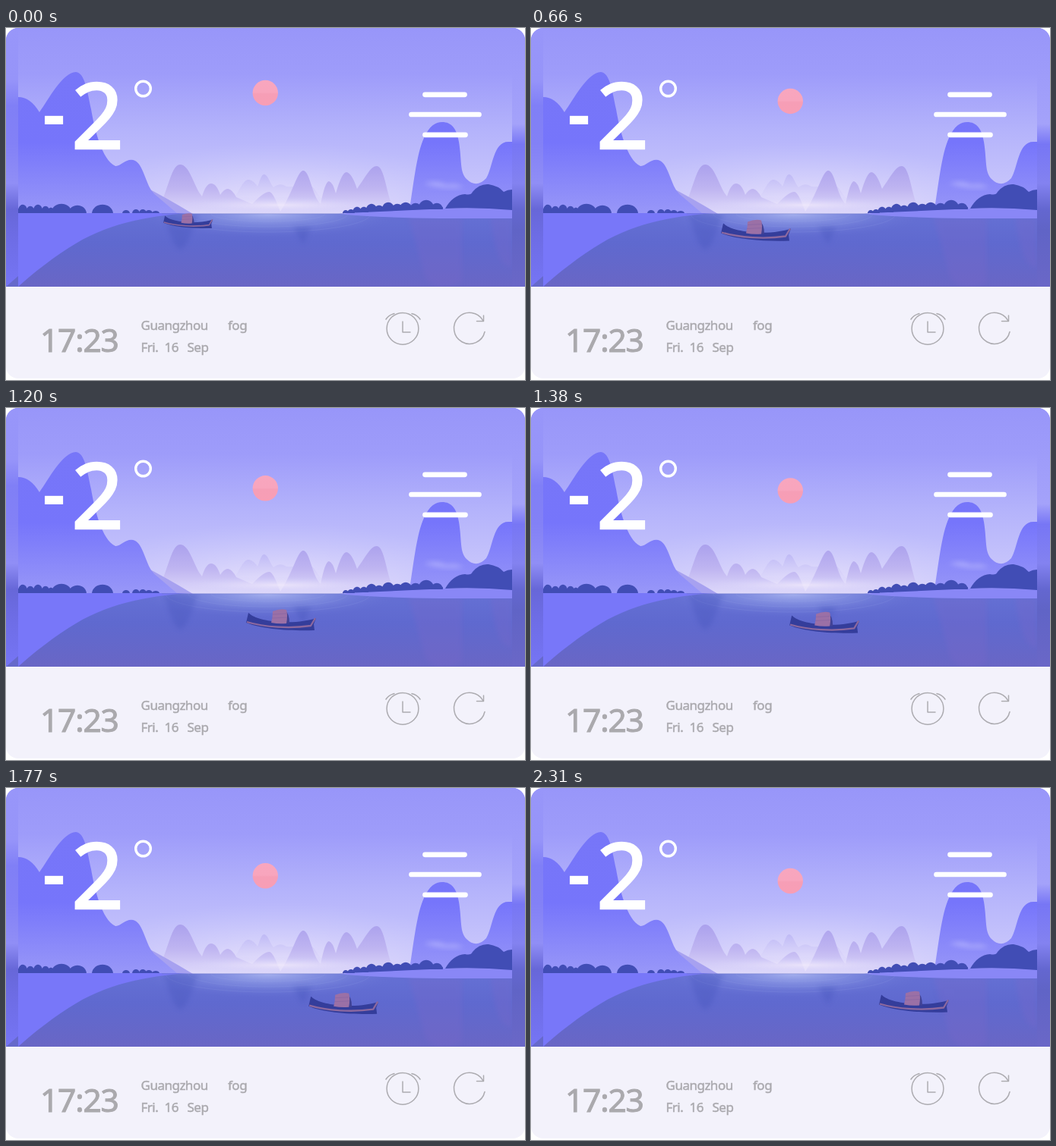
These frames come from a looping animation (683x464 px, 2340 ms). An HTML page:

```html
<!DOCTYPE html>
<html lang="en">
<head>
<meta charset="utf-8">
<title>Weather card</title>
<style>
  html, body { margin: 0; width: 100%; height: 100%; overflow: hidden; background: #fff; }
  svg { display: block; width: 683px; height: 464px; }
  text { font-family: "Noto Sans", "Open Sans", sans-serif; }
  .info { font-size: 17px; letter-spacing: -.5px; fill: #aaa9ae; stroke: #aaa9ae; stroke-width: .45; }
  .icon { fill: none; stroke: #adacb1; stroke-width: 1.5; stroke-linecap: round; stroke-linejoin: round; }
</style>
</head>
<body>
<svg viewBox="0 0 683 464">
  <defs>
    <clipPath id="card"><rect width="683" height="462" rx="16"/></clipPath>
    <clipPath id="view"><rect x="16" width="650" height="341"/></clipPath>
    <clipPath id="lake"><rect x="16" y="245" width="650" height="96"/></clipPath>
    <linearGradient id="sky" x2="0" y2="1">
      <stop stop-color="#9896f9"/><stop offset=".25" stop-color="#9e9cfa"/>
      <stop offset=".55" stop-color="#b4b3fb"/><stop offset="1" stop-color="#d0cdfb"/>
    </linearGradient>
    <radialGradient id="haze">
      <stop stop-color="#efe8fb"/><stop offset=".4" stop-color="#e2ddfb" stop-opacity=".65"/>
      <stop offset="1" stop-color="#cccafb" stop-opacity="0"/>
    </radialGradient>
    <linearGradient id="faint" gradientUnits="userSpaceOnUse" x1="0" x2="0" y1="192" y2="232">
      <stop stop-color="#b5aef2" stop-opacity=".65"/><stop offset="1" stop-color="#d5cff8" stop-opacity="0"/>
    </linearGradient>
    <linearGradient id="far" gradientUnits="userSpaceOnUse" x1="0" x2="0" y1="180" y2="244">
      <stop stop-color="#aba1ed"/><stop offset=".5" stop-color="#bfb5f1"/><stop offset="1" stop-color="#dfd9fa"/>
    </linearGradient>
    <linearGradient id="near" gradientUnits="userSpaceOnUse" x1="0" x2="0" y1="58" y2="244">
      <stop stop-color="#7776f8"/><stop offset=".5" stop-color="#7675fb"/><stop offset="1" stop-color="#9897f8"/>
    </linearGradient>
    <linearGradient id="water" x2="0" y2="1">
      <stop stop-color="#6570d4"/><stop offset=".4" stop-color="#5f69cf"/><stop offset="1" stop-color="#6966c5"/>
    </linearGradient>
    <radialGradient id="glow">
      <stop stop-color="#a5b0ee"/><stop offset=".5" stop-color="#8390e1" stop-opacity=".65"/>
      <stop offset="1" stop-color="#6570d4" stop-opacity="0"/>
    </radialGradient>
    <linearGradient id="sunFill" x2="0" y2="1">
      <stop stop-color="#f8a6be"/><stop offset=".48" stop-color="#f8a5bd"/>
      <stop offset=".54" stop-color="#f69eb6"/><stop offset="1" stop-color="#f89eb5"/>
    </linearGradient>
    <linearGradient id="leftEdge" x2="0" y2="1">
      <stop stop-color="#9896f9"/><stop offset=".2" stop-color="#9694f9"/><stop offset=".3" stop-color="#807ff6"/>
      <stop offset=".45" stop-color="#8381f6"/><stop offset=".6" stop-color="#908ef6"/>
      <stop offset=".7" stop-color="#6767d8"/><stop offset=".8" stop-color="#6d6ce4"/><stop offset="1" stop-color="#7675f5"/>
    </linearGradient>
    <linearGradient id="rightEdge" x2="0" y2="1">
      <stop stop-color="#9896f9"/><stop offset=".37" stop-color="#a4a2fa"/><stop offset=".45" stop-color="#7776f5"/>
      <stop offset=".6" stop-color="#8382f0"/><stop offset=".7" stop-color="#6467d0"/>
      <stop offset=".78" stop-color="#6064c6"/><stop offset="1" stop-color="#6a67c7"/>
    </linearGradient>
    <filter id="soft" x="-50%" y="-50%" width="200%" height="200%"><feGaussianBlur stdDeviation="3"/></filter>
    <filter id="hint"><feGaussianBlur stdDeviation=".5"/></filter>
  </defs>

  <g clip-path="url(#card)">
    <rect width="683" height="341" fill="url(#sky)"/>
    <rect width="16" height="341" fill="url(#leftEdge)"/>
    <path d="M0 341L16 327V341Z" fill="#6669cb"/>
    <rect x="666" width="17" height="341" fill="url(#rightEdge)"/>

    <g clip-path="url(#view)">
      <rect width="683" height="245" fill="url(#sky)"/>
      <ellipse cx="360" cy="246" rx="290" ry="95" fill="url(#haze)"/>
      <circle id="sun" cx="341.3" r="16.7" fill="url(#sunFill)"/>

      <path fill="url(#faint)" d="M300 225C309 210 313 199 320 200Q327 202 331 209C335 199 336 193 340 193C345 194 347 204 352 210Q361 203 369 209Q378 210 384 208Q395 202 405 211L420 232H300Z"/>
      <path fill="url(#far)" d="M196 244C212 225 216 180 229 180C242 180 247 209 258 222Q263 205 270 205Q277 205 282 220Q287 212 292 212Q298 213 303 223L324 232Q340 215 347 216Q352 217 361 242C376 220 384 188 391 188C400 188 402 220 414 232Q420 202 425 202Q430 203 434 218Q442 190 448 190Q455 191 462 212C474 195 480 182 488 182C498 182 501 220 508 232V244Z"/>
      <rect x="200" y="222" width="320" height="23" fill="url(#haze)" opacity=".8"/>

      <path fill="#a7a1f0" d="M180 208Q208 222 246 245H180Z"/>
      <path fill="url(#near)" d="M16 91Q32 91 44 111C56 94 74 59 92 58C104 59 107 84 112 107C116 131 126 174 144 182C151 183 159 170 170 175C180 180 184 204 192 215Q195 219 199 222L226 245H16Z"/>
      <path fill="url(#near)" d="M530 245C536 210 540 166 550 145C557 129 565 124 574 124C586 124 593 132 596 150C600 175 597 190 606 199Q619 212 632 198C641 183 641 150 661 150H666V245Z"/>
      <path fill="#c6c4ff" opacity=".55" filter="url(#soft)" d="M550 205Q568 200 580 207Q592 204 602 210Q575 213 550 205Z"/>

      <rect y="245" width="683" height="96" fill="url(#water)"/>
      <g clip-path="url(#lake)">
        <ellipse cx="345" cy="245" rx="175" ry="32" fill="url(#glow)"/>
        <g fill="none" stroke="#a4aeea" stroke-opacity=".15">
          <ellipse cx="345" cy="245" rx="75" ry="10"/><ellipse cx="345" cy="245" rx="105" ry="17"/>
          <ellipse cx="345" cy="245" rx="135" ry="24"/>
        </g>
        <g filter="url(#soft)" opacity=".28">
          <path fill="#3f50b7" d="M208 246H252Q238 292 229 292Q220 290 208 246ZM378 262H402L391 285Z"/>
          <path fill="#7d68c9" d="M530 250H600V335Q570 350 552 330ZM638 250H666V315Q645 318 638 250Z"/>
        </g>
      </g>
      <path fill="#7877f9" d="M16 244H240C185 248 135 258 92 284C65 300 37 322 16 341Z"/>
      <path fill="#8987f6" d="M438 245C500 239 580 237 666 237V251H570Q490 250 438 245Z"/>
      <path fill="none" stroke="#6d76ca" stroke-opacity=".6" d="M205 244.8H445"/>
      <g id="trees" fill="#414db5"></g>
      <path fill="#414db5" d="M443 244Q500 242 575 238V236Q500 237 443 243Z"/>
      <path fill="#414db5" d="M578 238Q588 220 604 219Q612 221 614 216Q623 205 635 206Q648 208 655 216Q660 213 666 213V240Q620 236 578 238Z"/>

      <g id="boat" filter="url(#hint)">
        <path fill="#343d9b" d="M3 5C10 11 20 15 45 17C65 18 80 16 92 12L89 20L90 28C60 29 22 27 0 18Z"/>
        <path fill="none" stroke="#8c689f" stroke-width="2.3" d="M1 17C24 24 58 26 85 22L91 12"/>
        <path fill="#414295" d="M50 1Q57 5 57 19L49 19Z"/>
        <path fill="#9b70a6" d="M35 3Q45 -1 53 1Q55 8 53 19Q43 20 33 18Q35 11 35 3Z"/>
        <path fill="none" stroke="#8060a0" stroke-width=".5" d="M35 7L53 6M34 12L54 11"/>
      </g>
    </g>

    <rect y="341" width="683" height="123" fill="#f3f2fb"/>
  </g>

  <g fill="#fff">
    <text x="48.3" y="145.5" style="font:700 92px 'Open Sans',sans-serif">-</text>
    <text x="86" y="159" font-size="121" stroke="#fff" stroke-width="2.4">2</text>
  </g>
  <g fill="none" stroke="#fff" stroke-linecap="round">
    <circle cx="180.5" cy="80" r="9.8" stroke-width="3.4"/>
    <path stroke-width="6.7" d="M551.5 87.8H603.5M533.5 114H622.5M551.5 140.8H604.5"/>
  </g>

  <text x="45" y="426.5" font-size="42.5" letter-spacing="-1.2" fill="#aaa9ad" stroke="#aaa9ad" stroke-width="1">17:23</text>
  <g class="info">
    <text x="177.5" y="398">Guangzhou</text><text x="292" y="398">fog</text>
    <text x="177.5" y="427">Fri.</text><text x="208.5" y="427">16</text><text x="238.5" y="427">Sep</text>
  </g>
  <g class="icon">
    <circle cx="522" cy="396.3" r="20.9"/>
    <path d="M522 387V401H532M500 384Q504 378 511 376.5M534 376.5Q541 378 545 384"/>
    <path d="M630 400.5A20.5 20.5 0 1 1 628 386M628.5 379V386.5H619.5"/>
  </g>
</svg>
<script>
const LOOP = 2340, STEP = 30, START = 30, END = 2160;
const sun = document.getElementById('sun');
const boat = document.getElementById('boat');

// Bushes: centre x, half width, height, base y
const bushes = [
  [22, 7, 11, 244], [32, 6, 9, 244], [42, 7, 11, 244], [52, 6, 9, 244], [59, 5, 7, 244],
  [73, 14, 12, 244], [94, 12, 10, 244], [127, 14, 11, 244],
  [158, 5, 4, 244], [171, 5, 5, 244], [180, 5, 5, 244], [188, 5, 4, 244], [197, 5, 3, 244],
  [447, 4, 4, 244], [454, 5, 5, 244], [462, 6, 7, 243], [471, 6, 7, 243], [481, 8, 10, 242],
  [491, 7, 7, 241], [503, 9, 11, 241], [515, 8, 8, 240], [526, 9, 10, 240],
  [539, 8, 8, 239], [553, 11, 12, 239], [567, 8, 8, 239]
];
document.getElementById('trees').innerHTML = bushes.map(([x, w, h, y]) =>
  `<path d="M${x - w} ${y}C${x - w * .85} ${y - h * 1.36} ${x + w * .85} ${y - h * 1.36} ${x + w} ${y}Z"/>`).join('');

// Boat course: time, left, top
const course = [
  [30, 207, 244], [300, 226, 248], [660, 250, 252.5], [1200, 316, 265],
  [1560, 366, 270.5], [1980, 431, 268], [2160, 458, 267.5]
];

function along(t, axis) {
  let i = 0;
  while (i < course.length - 2 && t > course[i + 1][0]) i++;
  const slope = k => {
    const a = course[Math.max(k - 1, 0)], b = course[Math.min(k + 1, course.length - 1)];
    return (b[axis] - a[axis]) / (b[0] - a[0]);
  };
  const a = course[i], b = course[i + 1], d = b[0] - a[0], u = (t - a[0]) / d, v = 1 - u;
  return a[axis] * v * v * (1 + 2 * u) + b[axis] * u * u * (3 - 2 * u)
    + d * u * v * (slope(i) * v - slope(i + 1) * u);
}

function draw(now) {
  const tick = Math.floor((now % LOOP) / STEP) * STEP;
  const t = Math.min(Math.max(tick, START), END);
  sun.setAttribute('cy', 85.5 + 37 * (t - START) / (END - START));
  const scale = Math.min(1, .71 + .29 * (t - START) / 630);
  boat.setAttribute('transform', `translate(${along(t, 1)} ${along(t, 2)}) scale(${scale})`);
  requestAnimationFrame(draw);
}
draw(0);
</script>
</body>
</html>
```
